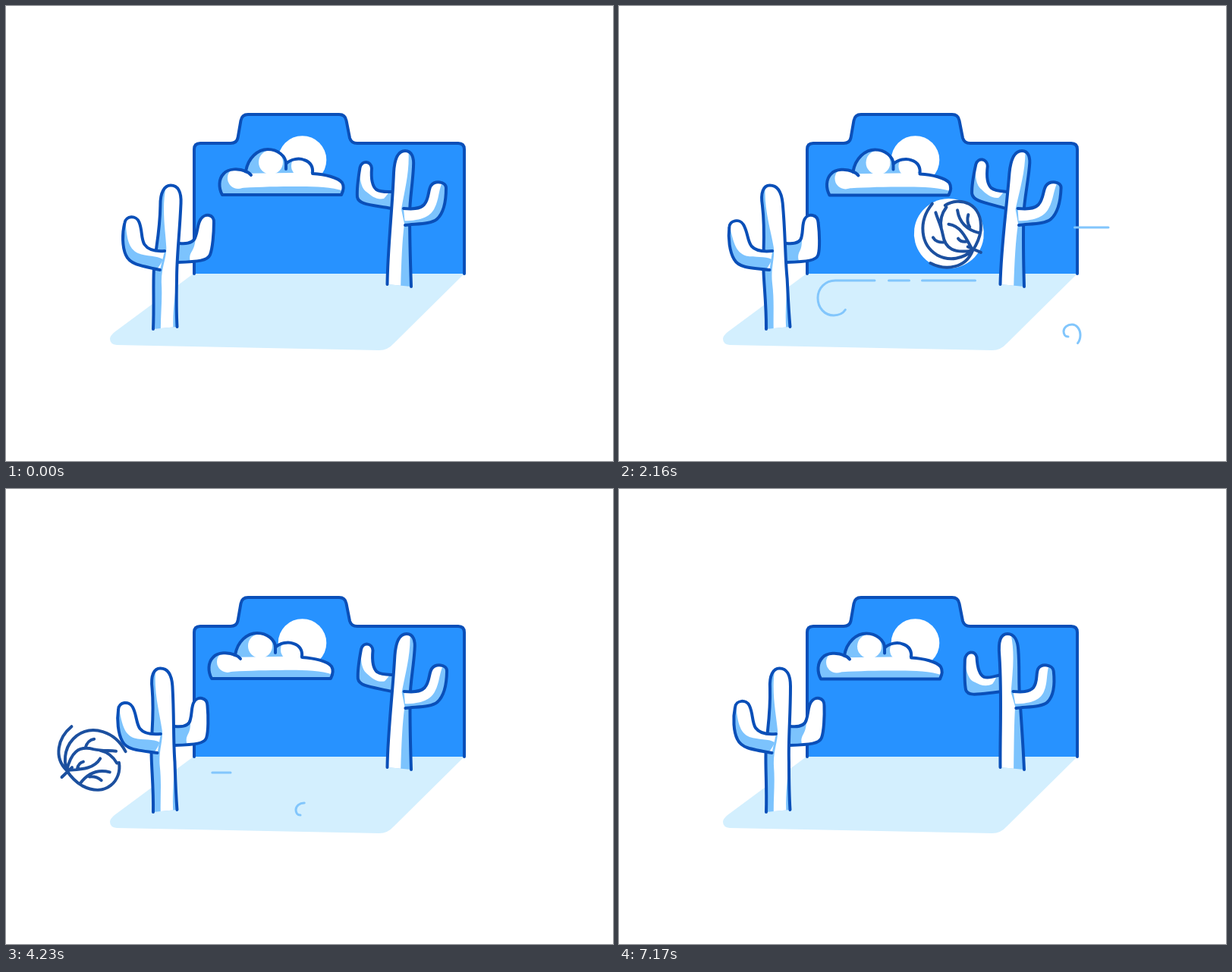
An HTML page with a canvas for the animation above (7200 ms loop, 800 px wide and 600 px high).

```html
<!DOCTYPE html>
<html lang="en">
<head>
<meta charset="utf-8">
<title>Desert wind</title>
<style>
  html, body { margin: 0; width: 100%; height: 100%; overflow: hidden; background: #fff; }
  canvas { display: block; width: 800px; height: 600px; }
</style>
</head>
<body>
<canvas id="stage" width="800" height="600"></canvas>
<script>
const ctx = document.getElementById('stage').getContext('2d');
const LOOP = 7200;
const INK = '#0a4fb8', SKY = '#2792ff', SHADE = '#7cc3fd', FLOOR = '#d3effe', WEED = '#1c509f';

// Motion tables: [time, value]
const cloudX = [[0, 0], [840, -3], [2160, -7.5], [3300, -11.2], [4230, -14], [5820, -17.5], [7200, -19]];
const leftSway = [[0, 5.5], [840, -3], [2160, -12.5], [3300, -15], [4230, -8], [5820, 0], [7200, 0]];
const rightSway = [[0, 0], [840, 2], [2160, 5], [3300, 6], [4230, 2], [5820, -9], [7200, -14]];
const weedX = [[0, 848], [840, 681], [2160, 435], [3300, 260], [4230, 113], [5160, -50]];
const weedTurn = [[0, 309], [840, 0], [2160, -442], [3300, -772], [4230, -1049], [5160, -1348]];
const HOP = { from: 1450, to: 2870, height: 51 };

// Smooth curve through a table
function curve(keys, t) {
  let i = 0;
  while (i < keys.length - 2 && t > keys[i + 1][0]) i++;
  const slope = n => {
    const a = keys[Math.max(0, n - 1)], b = keys[Math.min(keys.length - 1, n + 1)];
    return (b[1] - a[1]) / (b[0] - a[0]);
  };
  const [t0, v0] = keys[i], [t1, v1] = keys[i + 1];
  const d = t1 - t0, u = Math.min(1, (t - t0) / d), u2 = u * u, u3 = u2 * u;
  return (2 * u3 - 3 * u2 + 1) * v0 + (u3 - 2 * u2 + u) * d * slope(i)
    + (3 * u2 - 2 * u3) * v1 + (u3 - u2) * d * slope(i + 1);
}

function ease(u) {
  u = Math.max(0, Math.min(1, u));
  return u * u * (3 - 2 * u);
}

function fill(d, color) {
  ctx.fillStyle = color;
  ctx.fill(new Path2D(d));
}

function stroke(d, color = INK, width = 4) {
  ctx.strokeStyle = color;
  ctx.lineWidth = width;
  ctx.stroke(new Path2D(d));
}

function disc(x, y, r, color = '#fff') {
  ctx.fillStyle = color;
  ctx.beginPath();
  ctx.arc(x, y, r, 0, 7);
  ctx.fill();
}

function clipped(d, draw) {
  ctx.save();
  ctx.clip(new Path2D(d));
  draw();
  ctx.restore();
}

// ---- Backdrop ----
const frame = 'M248,353V189Q248,181 256,181H296Q304,181 305.500,174L309.500,151Q311,143 319,143H439Q447,143 448.500,151L453,174Q455,181 463,181H596Q604,181 604,189V353';
const floor = 'M247,353H604L511,445Q503,454 492,454L146,447Q137,446 137,439Q137,435 143,430Z';

function backdrop() {
  fill(floor, FLOOR);
  fill(frame, SKY);
  stroke(frame);
  disc(390.5, 203, 31.8);
}

// ---- Cloud ----
const cloudEdge = 'M285,249C280,240 280,228 287,221C293,214 307,214 316,218C319,200 332,189 345,189C358,189 369,198 369,208C375,202 386,200 393,203C402,206 405,212 404,221C420,222 438,226 443,233C446,238 444,245 442,249Z';

function cloud(t) {
  ctx.save();
  ctx.translate(curve(cloudX, t), 1.5 * t / LOOP);
  fill(cloudEdge, SHADE);
  clipped(cloudEdge, () => {
    disc(306, 227, 14);
    disc(349, 206, 16);
    disc(390, 211, 14);
    fill('M304,221L450,219L450,246C430,237 400,238 375,238C350,238 325,239 306,240Z', '#fff');
  });
  stroke(cloudEdge);
  stroke('M315,218Q320,219 323,223M369,208L369,215');
  ctx.restore();
}

// ---- Cacti ----
// Each part: [outline, lit area]; drawn back to front.
const leftCactus = {
  base: 426, height: 187, power: 1.6, cx: 212, dip: .006,
  parts: [
    ['M226,313C236,314 245,313 247,304C250,295 249,287 253,281C258,273 271,274 270.500,286C271,300 270,320 267,328C264,336 252,337 225,338',
     'M285,265L250,265C246,308 249,314 242,325C239,331 240,337 245,345L285,345Z'],
    ['M194,426C195,395 193,370 193.500,349C194,325 200,300 199,263C198,246 203,236.500 211.500,236.500C221,236.500 226,245 226,260C226,300 223,330 224,360C224,385 224,400 225.500,423',
     'M206,234C200,265 207,295 209,318C210,332 203,345 204,365C206,390 203,410 204,434L221,434C218,402 224,378 224,345L240,300L235,232Z'],
    ['M207,323C195,324 185,322 180,315C175,307 177,297 172,286C168,277 154,278 153,288C150,302 151,320 156,330C161,341 172,343 201.500,348',
     'M153,276C156,306 158,321 172,327C184,331 197,329 205,334C204,339 200,343 197,348L214,348L214,316L185,270Z']
  ]
};
const rightCactus = {
  base: 367, height: 176, power: 2, cx: 524, dip: .0155,
  parts: [
    ['M508,267C480,262 465,262 463,252C462,240 465,222 466.500,213C469,203 481,204 482,214C481,227 482,237 488,242C494,246 503,245 510,245',
     'M465,198C466,228 467,239 475,245C482,251 489,256 498,254C501,251 504,247 508,240L490,198Z'],
    ['M502.500,367C503,320 509,270 511,220C512,200 517,191 526,191C535,191 538,200 537,212C536,235 532,255 532,275C532,305 533,340 534,370',
     'M490,376L520,376C521,340 522,310 525,287L521,268C526,240 533,215 530,185L490,185Z'],
    ['M524,267C535,268 545,268 551,262C558,254 556,243 560,237C565,230 580,231 580,240C580,255 578,272 568,281C560,288 540,287 526,289',
     'M515,283C545,285 560,278 565,266C571,255 570,240 577,228L550,222L510,262Z']
  ]
};

function bend(d, c, s) {
  return d.replace(/([\d.]+),([\d.]+)/g, (_, px, py) => {
    const x = +px, y = +py, h = Math.max(0, c.base - y);
    const q = Math.pow(h / c.height, c.power);
    const sink = Math.max(0, c.cx - 15 - x) * c.dip * 1.3 * Math.min(1, h / 90);
    return (x + s * q).toFixed(2) + ',' + (y - s * sink).toFixed(2);
  });
}

function cactus(c, s) {
  for (const [edge, lit] of c.parts) {
    const d = bend(edge, c, s);
    fill(d, SHADE);
    clipped(d, () => fill(bend(lit, c, s), '#fff'));
    stroke(d);
  }
}

// ---- Wind ----
const gust = new Path2D('M221,0L23,0C10,0 0,10 0,23C0,36 9,46 21,46C32,46 39,39 39,29C39,21 34,15 28,15C22,15 17,19 17,24C17,28 19,31 23,31');
const GUST_LENGTH = 343;
const dashes = [[0, 83.5], [100.5, 127.5], [146, GUST_LENGTH]];
const gusts = [
  { x: 569, y: 405, start: 860, span: 1030, lag: 540 },
  { x: 262, y: 362, start: 1285, span: 1180, lag: 735 },
  { x: 424, y: 292, start: 1895, span: 1180, lag: 1080 },
  { x: 365, y: 399, start: 2515, span: 1180, lag: 740 },
  { x: 75, y: 374, start: 4054, span: 1090, lag: 640 },
  { x: 42, y: 404, start: 4260, span: 970, lag: 560 }
];

function wind(t) {
  ctx.strokeStyle = '#82c6fc';
  ctx.lineWidth = 3;
  for (const g of gusts) {
    const head = GUST_LENGTH * ease((t - g.start) / g.span);
    const tail = GUST_LENGTH * ease((t - g.start - g.lag) / g.span);
    ctx.save();
    ctx.translate(g.x, g.y);
    for (const [a, b] of dashes) {
      const from = Math.max(a, tail), to = Math.min(b, head);
      if (to - from < .5) continue;
      ctx.setLineDash([to - from, 2000]);
      ctx.lineDashOffset = -from;
      ctx.stroke(gust);
    }
    ctx.restore();
  }
}

// ---- Tumbleweed ----
const twigs = 'M36,-30C10,-46 -20,-38 -30,-15C-37,3 -30,20 -18,31'
  + 'M-42,-22C-50,0 -42,25 -18,31'
  + 'M36,-13C51,4 46,36 10,38C-3,38 -12,34 -18,31'
  + 'M-18,31C-25,8 -22,-5 -2,-11C10,-15 16,-20 25,-24'
  + 'M-12,-7C-14,-14 -12,-20 -8,-23M6,-14C15,-17 25,-16 34,-11'
  + 'M-18,31C-4,21 12,12 12,-5M-7,22C-9,17 -8,13 -5,10'
  + 'M6,37C8,18 18,8 32,4M12,23C17,19 22,18 28,19'
  + 'M-14,24L-19,42';

function tumbleweed(t) {
  if (t > 5160) return;
  const u = (t - HOP.from) / (HOP.to - HOP.from);
  const lift = u > 0 && u < 1 ? 4 * HOP.height * u * (1 - u) : 0;
  ctx.save();
  ctx.translate(curve(weedX, t), 351 - lift);
  ctx.rotate(curve(weedTurn, t) * Math.PI / 180);
  disc(0, 0, 46);
  ctx.translate(0, 3);
  stroke(twigs, WEED, 4);
  ctx.restore();
}

function draw(t) {
  ctx.fillStyle = '#fff';
  ctx.fillRect(0, 0, 800, 600);
  ctx.lineCap = ctx.lineJoin = 'round';
  backdrop();
  cloud(t);
  wind(t);
  cactus(rightCactus, curve(rightSway, t));
  tumbleweed(t);
  cactus(leftCactus, curve(leftSway, t));
}

function tick() {
  draw(performance.now() % LOOP);
  requestAnimationFrame(tick);
}
tick();
</script>
</body>
</html>
```
